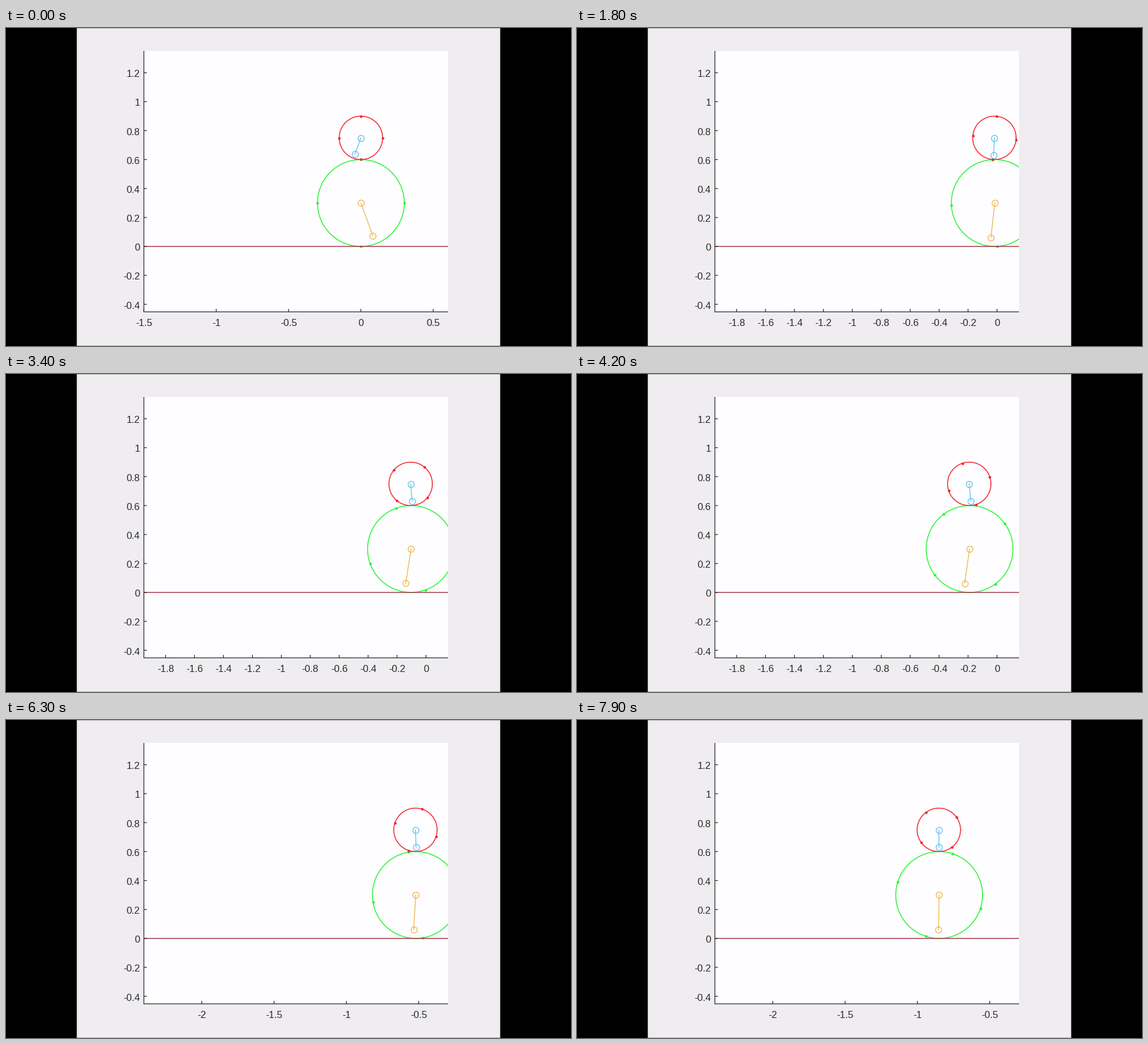
A matplotlib script for the animation above (8 s loop, 960x540 px).

```python
import numpy as np
import matplotlib.pyplot as plt
from matplotlib.animation import FuncAnimation
from matplotlib.patches import Rectangle

W, H, DPI = 960, 540, 100
FRAMES, STEP = 80, 100
PT = 72 / DPI                       # points per pixel
LEFT, RIGHT, TOP, BOTTOM = 234.3, 751, 39, 482
SCALE, FLOOR = 245.8, 370.9
R, r = 0.3, 0.15                    # ball radii
L_BIG, L_SMALL = 0.24, 0.12         # pendulum lengths
PAGE = R + r                        # the view jumps by this much
INK = "#2b2b2b"


def ring(t, period, fade, wave=np.cos):
    """Oscillation that dies out after the release."""
    return np.exp(-(t / fade) ** 2) * wave(2 * np.pi * t / period)


def roll(t):
    """Big ball: recoil at first, then a steadily faster roll to the left."""
    drive = 0.0744 - 0.0851 * t + 0.03086 * t ** 2 - 0.00097 * t ** 3
    start = 1 - np.exp(-(t / 1.1) ** 4)
    return 0.026 * ring(t, 0.9, 1.4, np.sin) - start * drive


def offset(t):
    """Small ball's sideways shift from the big one."""
    return -0.0022 * (1 - np.exp(-3 * t))


def swings(t):
    """Angles of both pendulums in degrees."""
    lean = 8.7 * np.exp(-((t - 3.5) / 3) ** 2)
    return (22.2 * ring(t, 0.8, 1.65) - lean,
            -21.3 * ring(t, 0.9, 1.65) + 0.58 * lean)


fig = plt.figure(figsize=(W / DPI, H / DPI), dpi=DPI, facecolor="black")
ax = fig.add_axes([0, 0, 1, 1])
ax.set(xlim=(0, W), ylim=(H, 0))
ax.axis("off")


def box(x0, y0, x1, y1, color):
    ax.add_patch(Rectangle((x0, y0), x1 - x0, y1 - y0, fc=color, lw=0, zorder=0))


def line(color, width=1.3, z=2, **kw):
    return ax.plot([], [], color=color, lw=width * PT, zorder=z, snap=False, **kw)[0]


def stroke(xs, ys, color=INK, width=1.3, z=5):
    art = line(color, width, z, solid_capstyle="butt")
    art.set_data(xs, ys)
    return art


def label(x, y, value, align):
    return ax.text(x, y, f"{value:g}", ha=align, va="baseline", color=INK,
                   family="Liberation Sans", size=16.6 * PT)


box(120, 0, 840, H, "#a6a5a7")
box(121, 1, 839, H - 1, "#efedf0")
box(LEFT, TOP, RIGHT, BOTTOM, "#fefdff")

stroke([LEFT, RIGHT], [FLOOR, FLOOR], "#a2243c", 1.4, 4)
stroke([LEFT, LEFT], [TOP, BOTTOM + 0.6])
stroke([LEFT, RIGHT], [BOTTOM, BOTTOM])
for k in range(-2, 7):
    y = FLOOR - 0.2 * k * SCALE
    stroke([LEFT, LEFT + 5], [y, y])
    label(227.5, y + 7.4, round(0.2 * k, 1), "right")


def x_axis(page, step):
    """Ticks and labels of one view position."""
    lo = -1.5 + page * PAGE
    arts = []
    for k in range(int(np.ceil(lo / step - 1e-6)), int((lo + 2.1) // step) + 1):
        x = LEFT + (k * step - lo) * SCALE
        arts += [stroke([x, x], [BOTTOM - 5, BOTTOM]),
                 label(x, 506.2, round(k * step, 1), "center")]
    return arts


axes_x = {0: x_axis(0, 0.5), -1: x_axis(-1, 0.2), -2: x_axis(-2, 0.5)}


class Ball:
    def __init__(self, radius, length, color, rod_color):
        self.radius, self.length = radius, length
        self.rim = line(color, 1.5)
        self.dots = line(color, 0, 3, marker="o", ms=4.4 * PT, mew=0, ls="")
        self.rod = line(rod_color, 1.3, 3, marker="o", ms=10.4 * PT,
                        mfc="none", mew=1.3 * PT)
        self.arts = [self.rim, self.dots, self.rod]
        view = Rectangle((LEFT, TOP), RIGHT - LEFT, BOTTOM - TOP,
                         transform=ax.transData)
        for art in self.arts:
            art.set_clip_path(view)

    def place(self, x, y, spin, swing, lo):
        def put(art, px, py):
            art.set_data(LEFT + (px - lo) * SCALE, FLOOR - py * SCALE)

        for art, a in ((self.rim, np.linspace(0, 2 * np.pi, 181)),
                       (self.dots, spin + np.arange(4) * np.pi / 2)):
            put(art, x + self.radius * np.cos(a), y + self.radius * np.sin(a))
        a = np.radians(swing)
        put(self.rod, x + self.length * np.array([0, np.sin(a)]),
            y - self.length * np.array([0, np.cos(a)]))


big = Ball(R, L_BIG, "#24f62e", "#ebb64a")
small = Ball(r, L_SMALL, "#f4222c", "#5fc0ea")


def draw(frame):
    t = frame * STEP / 1000
    x, d = roll(t), offset(t)
    page = int(np.floor(x / PAGE + 1e-9))
    lo = -1.5 + page * PAGE
    for key, arts in axes_x.items():
        for art in arts:
            art.set_visible(key == page)
    swing_big, swing_small = swings(t)
    big.place(x, R, -x / R, swing_big, lo)
    # rolling contact: the small ball turns against the big one
    small.place(x + d, R + np.sqrt(PAGE ** 2 - d ** 2), (x - d) / r,
                swing_small, lo)
    return big.arts + small.arts + sum(axes_x.values(), [])


anim = FuncAnimation(fig, draw, frames=FRAMES, interval=STEP, repeat=True,
                     repeat_delay=0, blit=False)
plt.show()
```
